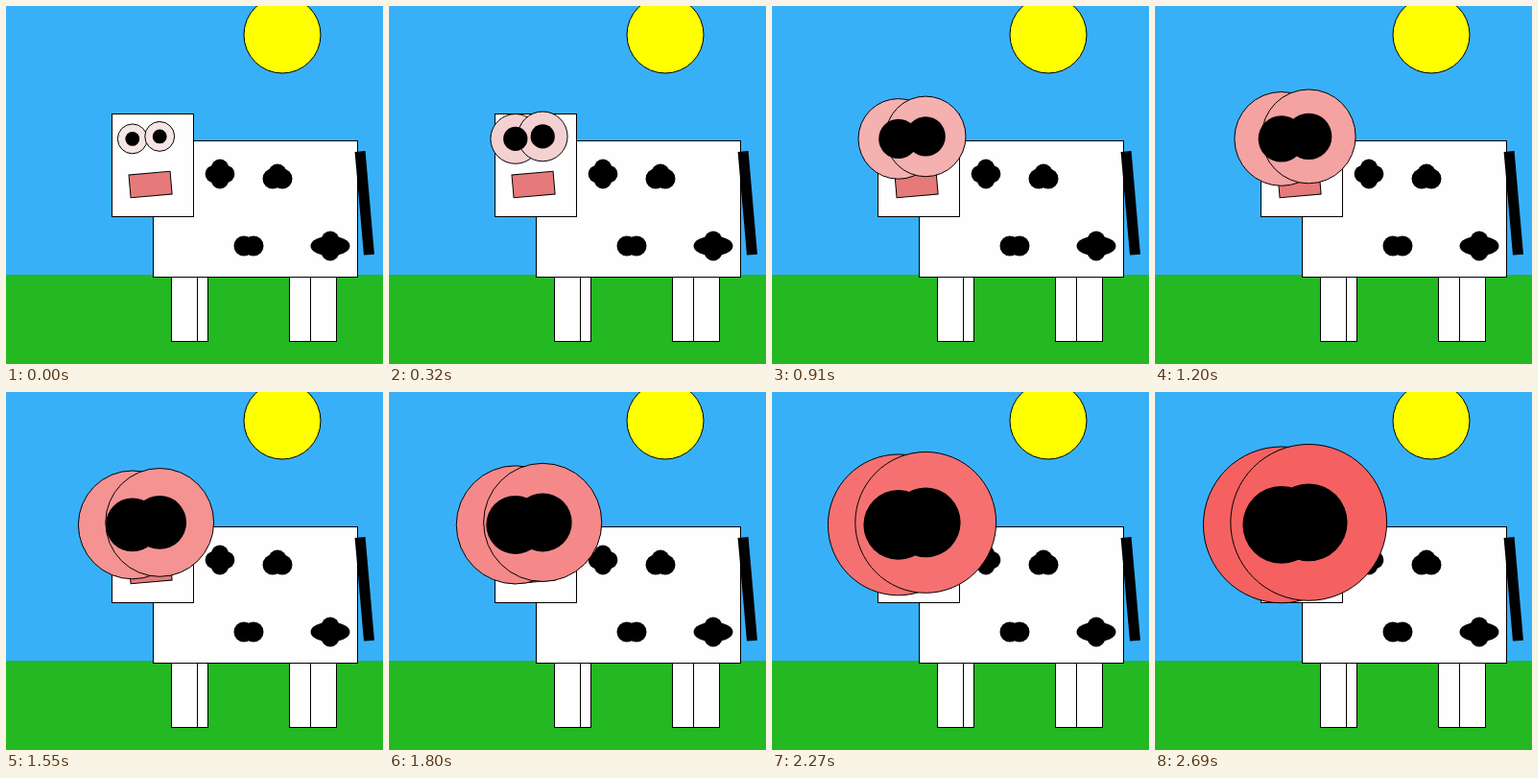
Write an HTML page that moves like this. It is 393 px wide and 373 px high and loops after 2720 ms.

```html
<!DOCTYPE html>
<html lang="en">
<head>
<meta charset="utf-8">
<title>Cow with growing eyes</title>
<style>
  html, body { margin: 0; width: 100%; height: 100%; overflow: hidden; background: #38b0f8; }
  svg { display: block; width: 393px; height: 373px; }
  .outlined { stroke: #000; stroke-width: 1; fill: #fefefe; }

  /* Growth slows down over the loop and pauses briefly a few times. */
  .eye, .pupil {
    animation: 2720ms infinite linear(
      0, .311 23.1% 26.8%, .492 40.4% 44%, .508 44.1% 46%,
      .621 57%, .765 73.9%, .879 83.4% 87.1%, 1 98.8% 100%);
  }
  .eye { animation-name: swell; }
  .pupil { animation-name: dilate; }
  @keyframes swell {
    from { r: 15.4px; fill: rgb(245, 229, 229); }
    to { r: 81.4px; fill: rgb(245, 97, 97); }
  }
  @keyframes dilate {
    from { r: 7.4px; }
    to { r: 40.4px; }
  }
</style>
</head>
<body>
<svg viewBox="0 0 393 373">
  <rect width="393" height="373" fill="#38b0f8"/>
  <rect y="280" width="393" height="93" fill="#24b822"/>
  <g class="outlined">
    <circle cx="288" cy="30" r="40" fill="#ff0"/>
    <rect x="172.5" y="270.5" width="27" height="79"/>
    <rect x="199.5" y="270.5" width="11" height="79"/>
    <rect x="295.5" y="270.5" width="22" height="79"/>
    <rect x="317.5" y="270.5" width="27" height="79"/>
    <rect x="153.5" y="140.5" width="213" height="142"/>
  </g>
  <rect id="tail" width="11" height="108" transform="translate(363.6 152) rotate(-5)"/>
  <g id="spots">
    <g transform="translate(223 175)">
      <circle cy="-6.3" r="9.1"/>
      <circle cy="6.3" r="9.1"/>
      <circle cx="-6.3" r="9.1"/>
      <circle cx="6.3" r="9.1"/>
    </g>
    <g transform="translate(283 180)">
      <circle cy="-5.7" r="9.7"/>
      <circle cx="-5" r="10.5"/>
      <circle cx="5" r="10.5"/>
    </g>
    <g transform="translate(253 250)">
      <circle cx="-5" r="10.5"/>
      <circle cx="5" r="10.5"/>
    </g>
    <g transform="translate(338 250)">
      <ellipse rx="20.5" ry="10.3"/>
      <circle cy="-6.2" r="9.3"/>
      <circle cy="6.2" r="9.3"/>
    </g>
  </g>
  <g class="outlined">
    <rect x="110.5" y="112.5" width="85" height="107"/>
    <rect width="43.2" height="23.9" fill="#e67a7a" transform="translate(128 176) rotate(-5)"/>
    <circle class="eye" cx="131.8" cy="138.4" r="15.4"/>
    <circle class="eye" cx="160.2" cy="135.9" r="15.4"/>
  </g>
  <circle class="pupil" cx="131.8" cy="138.4" r="7.4"/>
  <circle class="pupil" cx="160.2" cy="135.9" r="7.4"/>
</svg>
</body>
</html>
```
